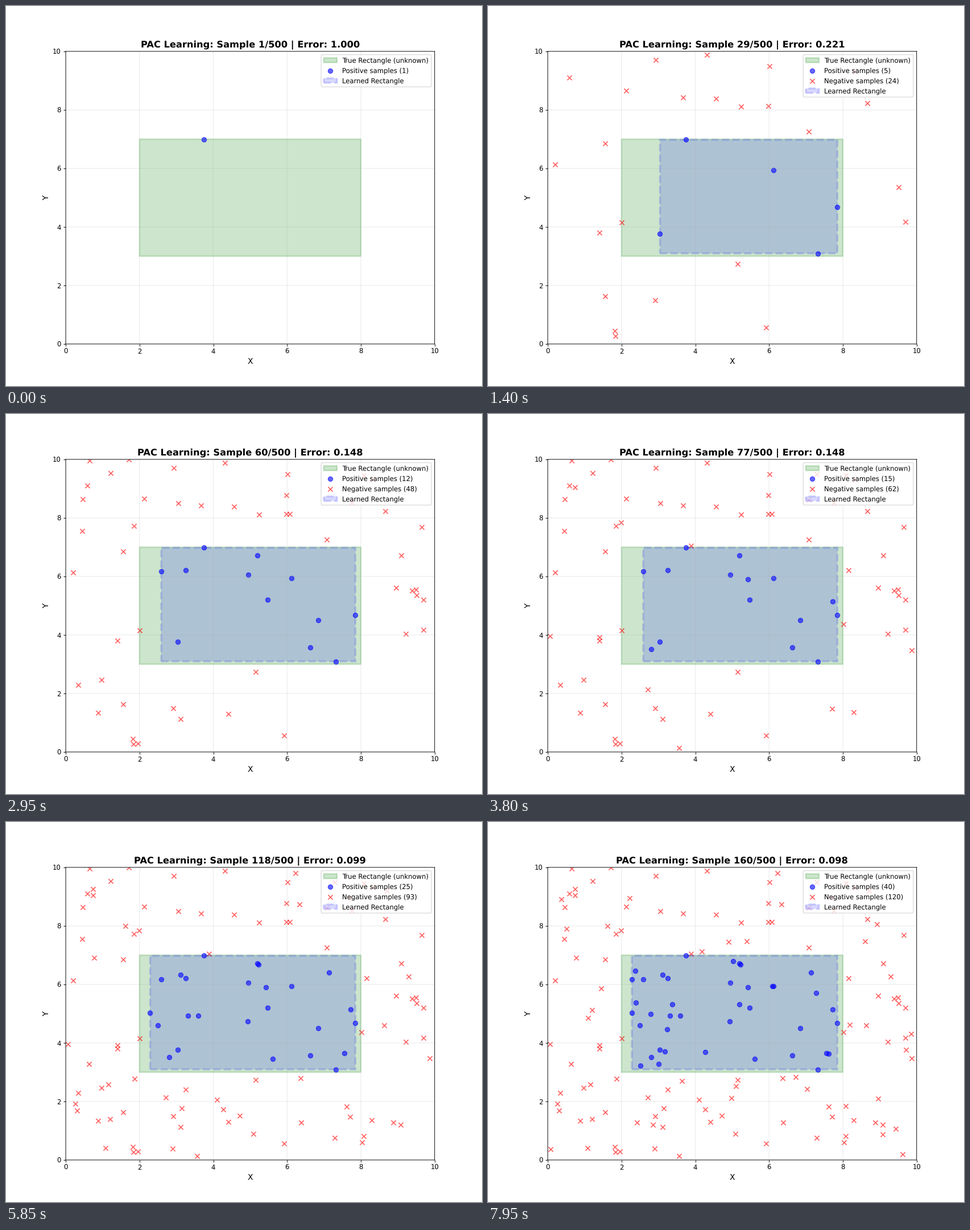
Write a matplotlib script that moves like this. It is 837 px wide and 669 px high and loops after 8000 ms.

```python
import numpy as np
import matplotlib.pyplot as plt
from matplotlib.animation import FuncAnimation
from matplotlib.patches import Rectangle

DPI = 83.7
TOTAL, FRAMES = 500, 160
X0, X1, Y0, Y1 = 2, 8, 3, 7

# Soft, unsnapped lines and unhinted text
plt.rcParams.update({"path.snap": False, "text.hinting": "none"})

rng = np.random.RandomState(42)
xs = rng.uniform(0, 10, TOTAL)
ys = rng.uniform(0, 10, TOTAL)
inside = (xs >= X0) & (xs <= X1) & (ys >= Y0) & (ys <= Y1)

fig, ax = plt.subplots(figsize=(837.01 / DPI, 669.01 / DPI), dpi=DPI)
fig.subplots_adjust(left=0.1255, right=0.9005, bottom=0.1106, top=0.8806)


def add_box(left, right, bottom, top, color, **style):
    ax.add_patch(Rectangle((left, bottom), right - left, top - bottom,
                           facecolor=color, edgecolor=color, **style))


def add_points(mask, kind, color, marker):
    if mask.any():
        n = len(mask)
        ax.scatter(xs[:n][mask], ys[:n][mask], c=color, marker=marker, s=50,
                   alpha=0.6, label=f"{kind} samples ({mask.sum()})")


def draw(frame):
    n = frame + 1
    pos = inside[:n]
    px, py = xs[:n][pos], ys[:n][pos]

    ax.clear()
    add_box(X0, X1, Y0, Y1, "green", alpha=0.2, linewidth=2,
            label="True Rectangle (unknown)")
    add_points(pos, "Positive", "blue", "o")
    add_points(~pos, "Negative", "red", "x")

    left, right, bottom, top = px.min(), px.max(), py.min(), py.max()
    add_box(left, right, bottom, top, "blue", alpha=0.15, linewidth=3,
            linestyle="--", label="Learned Rectangle")
    error = 1 - (right - left) * (top - bottom) / ((X1 - X0) * (Y1 - Y0))

    ax.set_xlim(0, 10)
    ax.set_ylim(0, 10)
    ax.set_xlabel("X", fontsize=12)
    ax.set_ylabel("Y", fontsize=12)
    ax.set_title(f"PAC Learning: Sample {n}/{TOTAL} | Error: {error:.3f}",
                 fontsize=14, fontweight="bold")
    ax.grid(True, alpha=0.3)
    ax.legend(loc="upper right", labelspacing=0.54)
    return []


anim = FuncAnimation(fig, draw, frames=FRAMES, interval=50,
                     init_func=lambda: draw(0), repeat=True, repeat_delay=0)
plt.show()
```
